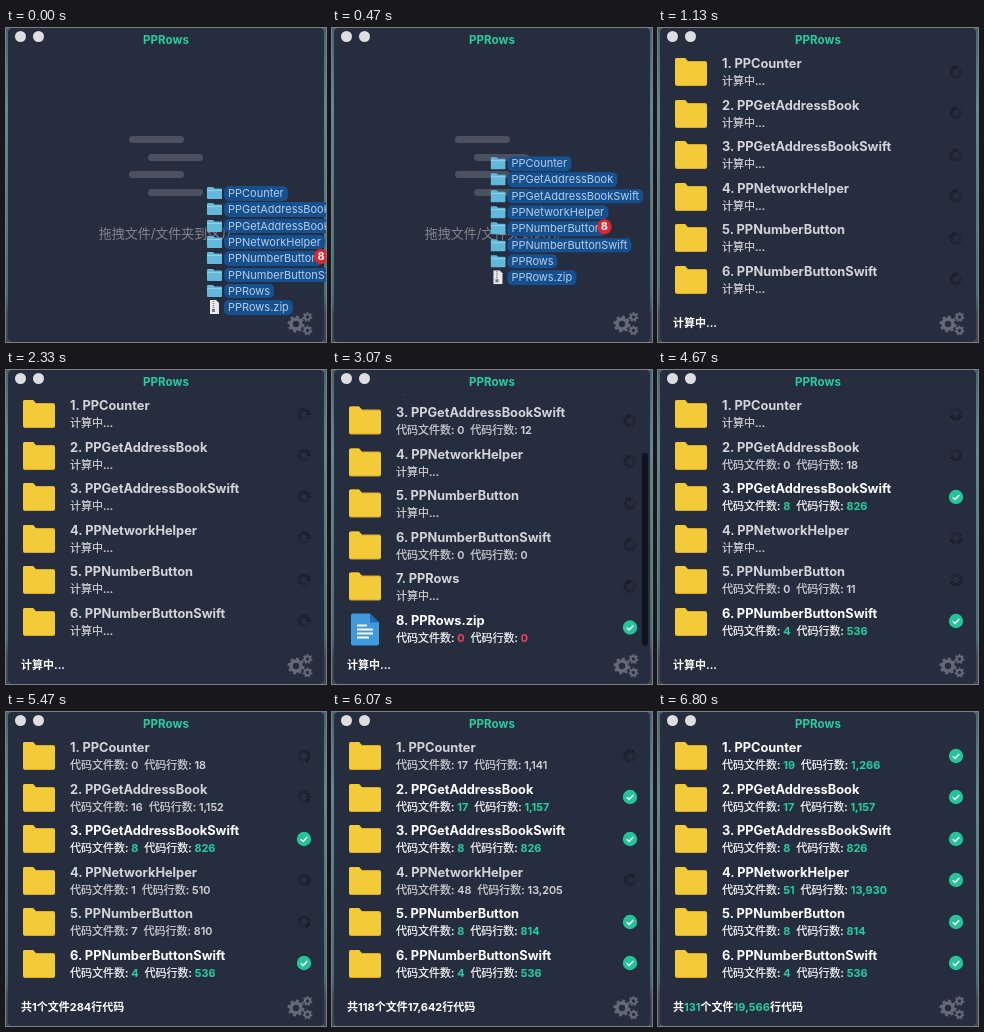
Write an HTML page that moves like this. It is 320 px wide and 314 px high and loops after 6.87 s.

```html
<!DOCTYPE html>
<html lang="zh-CN">
<head>
<meta charset="utf-8">
<title>PPRows</title>
<style>
  :root { --loop: 6870ms; --teal: #27cda0; --red: #ee4658; }
  * { box-sizing: border-box; }
  html, body { margin: 0; width: 100%; height: 100%; overflow: hidden; }
  body {
    position: relative;
    background: linear-gradient(#3d666b, #578b8e 25%, #3f6c74 85%, #39414c 92%);
    font-family: Inter, "Noto Sans CJK SC", "Noto Sans CJK", sans-serif;
  }
  body * { position: absolute; }
  b { position: static; font-weight: 500; }

  .window {
    left: 2px; top: 0; width: 316px; height: 314px;
    background: #262d3f; border-radius: 4px;
    box-shadow: 0 0 1px #8b9aa3;
  }
  .stage, .empty, .full { left: 0; top: 0; width: 320px; height: 314px; overflow: hidden; }
  .dot { top: 2.5px; width: 11px; height: 11px; border-radius: 50%; background: #dedee0; }
  .caption {
    left: 0; width: 320px; top: 3.5px; line-height: 16px; text-align: center;
    font-size: 11.6px; font-weight: 700; color: var(--teal);
  }
  .gears { left: 280px; top: 282px; }

  .empty { animation: empty var(--loop) step-end infinite; }
  .full { animation: full var(--loop) step-end infinite; }
  @keyframes empty { 0% { visibility: visible; } 10.63%, 100% { visibility: hidden; } }
  @keyframes full { 0% { visibility: hidden; } 10.63%, 100% { visibility: visible; } }

  .bar { width: 55px; height: 7px; border-radius: 4px; background: #4b5161; }
  .hint {
    left: 0; width: 320px; top: 195px; line-height: 20px; text-align: center;
    font-size: 13px; color: #80848e;
  }
  .drag { left: 201px; top: 157px; animation: drag var(--loop) ease-in-out infinite; }
  @keyframes drag {
    0%, 1% { transform: none; }
    9%, 100% { transform: translate(-50px, -35px); }
  }
  .drag svg { left: 0; top: 1px; }
  .item { left: 0; height: 16px; }
  .item span {
    left: 17px; top: 1px; height: 14.5px; line-height: 14.5px; padding: 0 4px;
    border-radius: 5px; background: #17508f; color: #b5cce6; font-size: 11px;
  }
  .badge {
    left: 107px; top: 64px; width: 14px; height: 15px; line-height: 15px; border-radius: 7px;
    background: #e0252f; color: #fff; font-size: 11px; font-weight: 700; text-align: center;
  }

  .view { left: 0; top: 24px; width: 320px; height: 254px; overflow: hidden; }
  .rows { left: 0; top: 0; width: 320px; animation: scroll var(--loop) ease-in-out infinite; }
  @keyframes scroll {
    0%, 35.7% { transform: none; }
    42.9%, 46.6% { transform: translateY(-76.5px); }
    53.9%, 100% { transform: none; }
  }
  .knob {
    left: 310px; top: 1px; width: 6px; height: 193px; border-radius: 3px; background: #10141c;
    animation: knob var(--loop) ease-in-out infinite, fade var(--loop) linear infinite;
  }
  @keyframes knob {
    0%, 35.7% { transform: none; }
    42.9%, 46.6% { transform: translateY(58px); }
    53.9%, 100% { transform: none; }
  }
  @keyframes fade { 0%, 35% { opacity: 0; } 36%, 62.5% { opacity: 1; } 66%, 100% { opacity: 0; } }

  .row { left: 0; width: 320px; height: 41.5px; color: #d3d4d8; }
  .icon { left: 16px; top: 4px; }
  .item span, .name, .info, .total { white-space: pre; }
  .name { left: 64px; top: 4px; line-height: 16px; font-size: 12.8px; font-weight: 700; }
  .info {
    left: 64px; top: 21px; line-height: 16px; font-size: 11px; font-weight: 500;
    -webkit-text-stroke: 0.2px;
  }
  .spin, .check { left: 290px; top: 11.5px; }
  .spin { animation: spin 981.4ms steps(12) infinite; }
  @keyframes spin { to { transform: rotate(360deg); } }
  .check { visibility: hidden; }
  .done { color: #fff; }
  .done b { color: var(--teal); font-weight: 600; }
  .done.zero b { color: var(--red); }
  .done .spin { display: none; }
  .done .check { visibility: inherit; }
  .total { left: 15px; top: 287px; line-height: 16px; font-size: 11px; font-weight: 700; color: #fff; }
  .total b { font-weight: inherit; }
</style>
</head>
<body>
<div class="window"></div>
<div class="stage">
  <div class="empty">
    <div class="bar" style="left:123px;top:107.5px"></div>
    <div class="bar" style="left:142px;top:125.5px"></div>
    <div class="bar" style="left:123px;top:143px"></div>
    <div class="bar" style="left:142px;top:161px"></div>
    <div class="hint">拖拽文件/文件夹到这儿</div>
  </div>

  <div class="full">
    <div class="view"><div class="rows"></div><div class="knob"></div></div>
    <div class="total"></div>
  </div>

  <div class="dot" style="left:8.5px"></div>
  <div class="dot" style="left:26.5px"></div>
  <div class="caption">PPRows</div>
  <svg class="gears" width="28" height="28" fill="none" stroke="#646a77">
    <circle cx="10" cy="14" r="5" stroke-width="3.6"/>
    <circle cx="10" cy="14" r="7.4" stroke-width="2.2" pathLength="16" stroke-dasharray="1 1"/>
    <g id="cog">
      <circle cx="21.5" cy="7" r="2.7" stroke-width="2"/>
      <circle cx="21.5" cy="7" r="4.2" stroke-width="1.5" pathLength="14" stroke-dasharray="1 1"/>
    </g>
    <use href="#cog" y="13.5"/>
  </svg>

  <div class="empty"><div class="drag"></div></div>
</div>

<script>
const LOOP = 6870, COUNT = 1080;

// name, files, lines, time the numbers appear, time counting starts
const projects = [
  ['PPCounter', 19, 1266, 5305, 5305],
  ['PPGetAddressBook', 17, 1157, 4501, 4501],
  ['PPGetAddressBookSwift', 8, 826, 2904, 2904],
  ['PPNetworkHelper', 51, 13930, 5245, 5245],
  ['PPNumberButton', 8, 814, 4506, 4506],
  ['PPNumberButtonSwift', 4, 536, 3020, 3233],
  ['PPRows', 24, 1037, 4600, 4600],
  ['PPRows.zip', 0, 0, 1500, 1500],
];
const total = { files: 131, lines: 19566, start: 5305 };
const busy = '计算中...';

const $ = s => document.querySelector(s);
const svg = (cls, w, h, body) => `<svg class="${cls}" width="${w}" height="${h}">${body}</svg>`;

const folder = svg('icon', 34, 34,
  `<path d="M1 4q0-2 2-2h8l3 3h17q2 0 2 2v21q0 2-2 2H3q-2 0-2-2z" fill="#dcae2c"/>
   <path d="M1 4q0-2 2-2h8l3 4h17q2 0 2 2v19q0 2-2 2H3q-2 0-2-2z" fill="#f3ca37"/>`);
const sheet = svg('icon', 34, 34,
  `<path d="M3 3q0-2 2-2h17l9 9v21q0 2-2 2H5q-2 0-2-2z" fill="#3f9ae0"/>
   <path d="M22 1l9 9h-9z" fill="#2468a8"/>
   <path d="M9 13h10M9 17h16M9 21h16M9 25h12" stroke="#fff" stroke-width="1.8"/>`);
const spokes = Array.from({ length: 12 }, (_, i) =>
  `<path d="M8 1.7v2.6" transform="rotate(${i * 30} 8 8)" opacity="${0.3 + i * 0.06}"/>`).join('');
const spinner = svg('spin', 16, 16, `<g stroke="#0b0d13" stroke-width="1.1" stroke-linecap="round">${spokes}</g>`);
const check = svg('check', 16, 16,
  `<circle cx="8" cy="8" r="7.2" fill="#25c398"/>
   <path d="M4.8 8.2l2.3 2.3 4.2-4.5" fill="none" stroke="#fff" stroke-width="1.5"/>`);
const smallFolder = svg('', 16, 14,
  '<path d="M0 2q0-1 1-1h5l1.5 1.5H14q1 0 1 1V12q0 1-1 1H1q-1 0-1-1z" fill="#63b9dc"/><path d="M0 4.5h15" stroke="#8fd2ec"/>');
const smallZip = svg('', 16, 14,
  '<path d="M3 0h6l3 3v11H3z" fill="#e8e9ea"/><path d="M6.5 1v8" stroke="#777" stroke-width="1.5" stroke-dasharray="1 1"/><path d="M5 9h3v3H5z" fill="#777"/>');

$('.drag').innerHTML = projects.map(([name], i) =>
  `<div class="item" style="top:${i * 16.3}px">${name.endsWith('.zip') ? smallZip : smallFolder}<span>${name}</span></div>`
).join('') + '<div class="badge">8</div>';

$('.rows').innerHTML = projects.map(([name, files], i) =>
  `<div class="row${files ? '' : ' zero'}" style="top:${i * 41.5}px">${files ? folder : sheet}
   <div class="name">${i + 1}. ${name}</div><div class="info"></div>${spinner}${check}</div>`).join('');

const rows = [...document.querySelectorAll('.row')];
const infos = rows.map(r => r.querySelector('.info'));
const footer = $('.total');

function ease(p) {
  p = Math.min(Math.max(p, 0), 1);
  return p < 0.5 ? 4 * p ** 3 : 1 - 4 * (1 - p) ** 3;
}
const num = (n, k) => `<b>${Math.floor(n * k).toLocaleString('en-US')}</b>`;

function put(el, html) {
  if (el.shown !== html) el.innerHTML = el.shown = html;
}

function render(t) {
  projects.forEach(([, files, lines, shown, start], i) => {
    const k = ease((t - start) / COUNT);
    put(infos[i], t < shown ? busy : `代码文件数: ${num(files, k)}  代码行数: ${num(lines, k)}`);
    rows[i].classList.toggle('done', t >= start + COUNT);
  });
  const k = ease((t - total.start) / COUNT);
  put(footer, t < total.start ? busy : `共${num(total.files, k)}个文件${num(total.lines, k)}行代码`);
  footer.classList.toggle('done', t >= total.start + COUNT);
}

const begin = performance.now();
function tick() {
  render((performance.now() - begin) % LOOP);
  requestAnimationFrame(tick);
}
tick();
</script>
</body>
</html>
```
